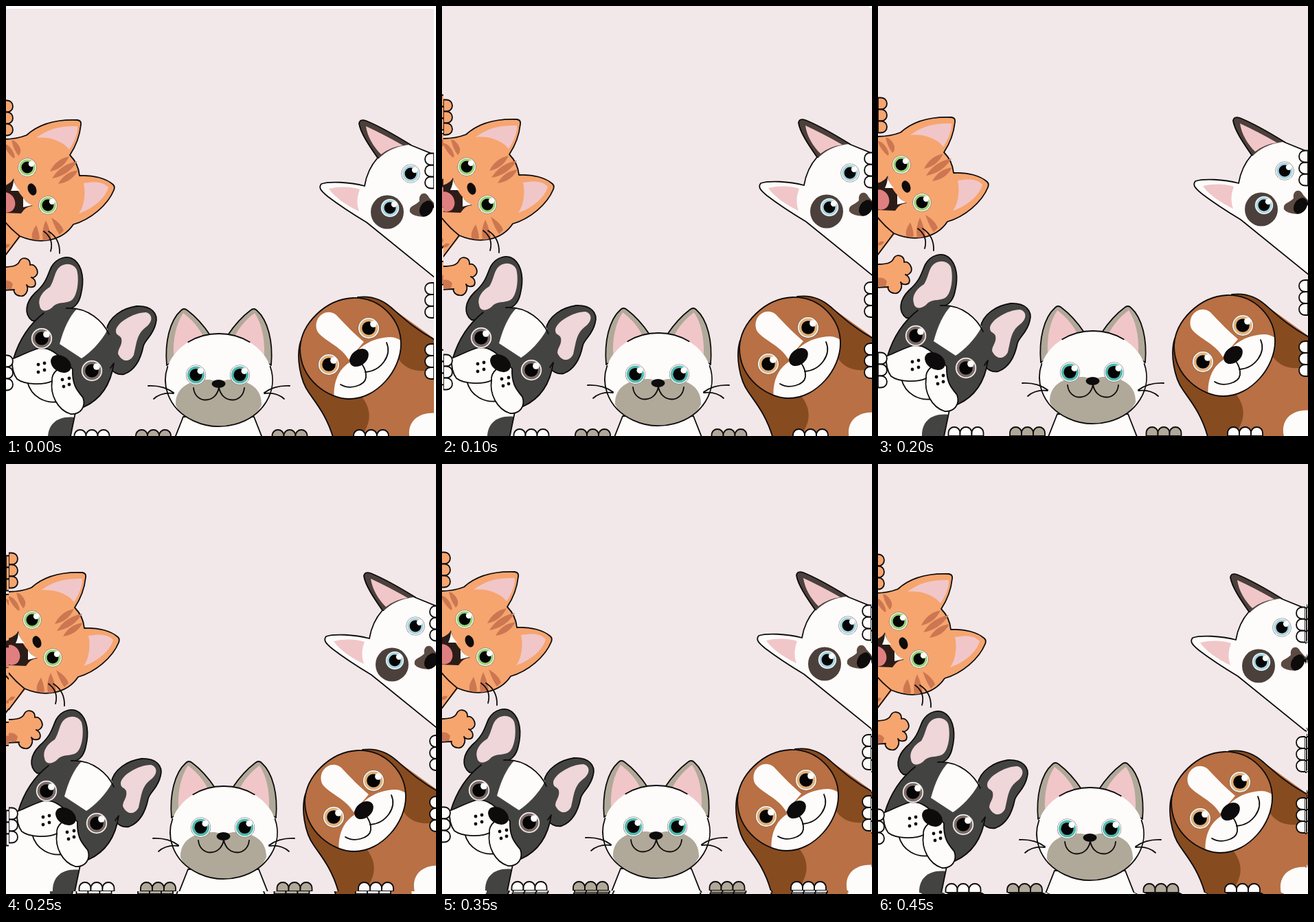
An HTML page with a canvas for the animation above (500 ms loop, 626 by 626 pixels).

```html
<!DOCTYPE html>
<html lang="en">
<head>
<meta charset="utf-8">
<title>Shaking pets</title>
<style>
  html, body { margin: 0; width: 100%; height: 100%; overflow: hidden; background: #fff; }
  canvas { display: block; }
</style>
</head>
<body>
<canvas id="stage" width="626" height="626"></canvas>
<script>
const SIZE = 626, STEP = 50;
// Position of the scene at each step of the shake
const SHAKE = [[-3, 4], [-4, -4], [2, 3], [-5, 4], [0, 0], [4, -4], [1, -2], [-1, -5], [-2, -1], [-4, -2]];
const INK = '#0d0b0b', WHITE = '#fdfcfb', PINK = '#f1c6c8', GREY = '#b0a999';
const ORANGE = '#f6a56f', RUST = '#cc7751', COAL = '#434341', BLUSH = '#efd6d8';
const TAN = '#b87044', BROWN = '#874b20', COCOA = '#4b403b';

const scene = document.createElement('canvas');
scene.width = scene.height = SIZE;
const c = scene.getContext('2d');

function fill(d, color) {
  c.fillStyle = color;
  c.fill(new Path2D(d));
}
function line(d) {
  c.stroke(new Path2D(d));
}
function shape(d, color) {
  fill(d, color);
  line(d);
}
function oval(x, y, rx, ry, color, degrees = 0) {
  c.beginPath();
  c.ellipse(x, y, rx, ry, degrees * Math.PI / 180, 0, 7);
  c.fillStyle = color;
  c.fill();
}
function eye(x, y, r, color) {
  oval(x, y, r + .6, r + .6, '#6d6762');
  oval(x, y, r, r, WHITE);
  oval(x, y, r * .9, r * .9, color);
  oval(x, y, r * .65, r * .65, '#050505');
  oval(x + r * .46, y - r * .4, r * .32, r * .32, WHITE);
}
// Tapered stripe between two points
function leaf(x1, y1, x2, y2, w, color = RUST) {
  const len = Math.hypot(x2 - x1, y2 - y1), nx = (y1 - y2) / len * w, ny = (x2 - x1) / len * w;
  const mx = (x1 + x2) / 2, my = (y1 + y2) / 2;
  fill(`M${x1},${y1}Q${mx + nx},${my + ny} ${x2},${y2}Q${mx - nx},${my - ny} ${x1},${y1}Z`, color);
}
// Three toes gripping an edge; angle 0 points up
function paw(x, y, degrees, color) {
  c.save();
  c.translate(x, y);
  c.rotate(degrees * Math.PI / 180);
  for (const toe of [-17, 0, 17]) {
    shape(`M${toe - 8.5},0V-4C${toe - 8.5},-16 ${toe + 8.5},-16 ${toe + 8.5},-4V0Z`, color);
  }
  c.restore();
}

function orangeCat() {
  fill('M-4,290L24,333L-4,368Z', ORANGE);
  line('M20,335L-4,367');
  leaf(-4, 352, 6, 347, 5);
  shape('M-5,194C8,194 20,192 30,188C52,168 80,165 104,166Q110,167 109,173C107,192 101,205 93,217' +
    'C102,226 106,236 107,247C128,246 146,251 156,260Q159,263 157,268C148,290 123,311 98,318' +
    'C82,342 50,348 20,335Q6,324 -5,310Z', ORANGE);
  fill('M44,192C60,179 80,174 104,175C105,186 98,200 92,209C82,196 62,190 44,192Z', PINK);
  fill('M113,258C130,255 142,256 149,264C145,280 125,296 106,302C115,290 116,270 113,258Z', PINK);
  leaf(92, 219, 64, 241, 9);
  leaf(104, 226, 67, 251, 10);
  leaf(105, 239, 76, 259, 9);
  fill('M8,195Q17,197 21,208Q22,215 18,218Q11,209 8,195Z', RUST);
  fill('M-4,200Q7,202 12,216Q14,223 10,221Q0,212 -4,200Z', RUST);
  fill('M44,319Q36,330 38,339Q44,342 49,339Q48,328 44,319Z', RUST);
  fill('M58,312Q51,327 54,341Q61,342 66,338Q64,325 58,312Z', RUST);
  fill('M66,308Q72,325 78,333L84,327Q81,317 66,308Z', RUST);
  eye(31, 235, 13, '#9bd275');
  eye(61, 290, 13, '#9bd275');
  oval(38, 267, 6, 9, INK, -22);
  fill('M-4,262Q7,259 11,251C14,264 18,271 25,279Q31,288 39,291Q29,291 22,302L-4,301Z', '#2b1c17');
  oval(0, 286, 13, 15, '#e07f80', -25);
  fill('M11,253Q13,262 20,269L7,269Q11,261 11,253Z', WHITE);
  fill('M25,279Q30,287 38,290L25,293Z', WHITE);
  line('M55,328Q70,339 65,357');
  line('M62,328Q79,339 78,360');
  shape('M-5,380C8,380 17,379 20,371C24,364 36,367 35,377C42,375 48,385 45,391C42,396 38,396 37,395' +
    'C45,399 44,408 39,409C34,410 31,408 30,406C34,414 28,424 20,422C12,421 11,414 12,413L-5,414Z', ORANGE);
  fill('M-4,400Q5,398 10,405L8,412H-4Z', RUST);
  paw(-3, 163, 90, ORANGE);
}

function frenchie() {
  fill('M-4,540H70L102,590L93,631H-4Z', WHITE);
  fill('M100,599C74,596 60,610 61,631H93Z', COAL);
  line('M101,592L93,631');
  shape('M38,458C26,449 28,432 42,418C60,402 60,392 66,380C74,366 90,362 100,370' +
    'C112,380 114,400 109,420C106,434 98,440 93,440L60,460Z', COAL);
  fill('M49,436C46,425 54,415 64,409C70,400 70,390 76,382C84,373 98,374 103,384' +
    'C107,398 104,420 97,427C90,434 78,430 70,436C60,447 50,445 49,436Z', BLUSH);
  shape('M146,472C150,452 170,440 190,437C212,436 222,448 218,462C214,480 203,485 200,495' +
    'C196,515 188,530 172,536Q160,538 152,528Z', COAL);
  fill('M160,473C160,462 185,446 204,446C216,450 212,462 203,468C190,478 190,492 186,508' +
    'C180,520 168,518 163,506C163,498 170,494 168,484C165,478 160,480 160,473Z', BLUSH);
  const head = 'M11,513C18,490 32,465 52,450C66,438 82,438 100,440C122,444 140,458 150,478' +
    'C158,492 160,505 157,520C152,555 135,574 113,584';
  fill(head + 'L70,550Z', COAL);
  fill('M104,440C124,444 140,457 148,471C138,490 122,505 110,513L78,492C84,470 92,452 104,440Z', WHITE);
  line('M55,447C32,465 18,490 11,513');
  line('M88,440C120,438 142,460 150,478');
  line('M152,527L157,520C152,555 135,574 113,584');
  shape('M31,547C37,570 58,579 76,576L68,540Z', WHITE);
  shape('M9,514C20,510 34,502 49,498C64,497 76,506 97,529C96,552 104,560 112,570' +
    'C117,584 108,595 94,594C75,588 64,566 67,546C55,552 28,552 16,543Q8,532 9,514Z', WHITE);
  line('M67,546Q66,537 74,530');
  oval(80, 521, 16, 11.5, INK, 32);
  for (const [x, y] of [[47, 522], [56, 520], [47, 533], [56, 530], [82, 544], [92, 542], [84, 554], [92, 551]]) {
    oval(x, y, 2.4, 2.4, INK);
  }
  eye(52, 484, 15, '#7b6b67');
  eye(125, 531, 15, '#7b6b67');
  paw(-3, 534, 90, WHITE);
  paw(125, 630, 0, WHITE);
}

function siamese() {
  const ear = 'M234,523C231,490 238,458 255,443Q259,439 264,443C276,452 287,464 297,479L270,500Z';
  const innerEar = 'M244,508C243,484 248,462 258,447C270,456 281,468 287,481Q260,488 244,508Z';
  shape('M258,598L245,631H374L361,598Z', WHITE);
  const mirrored = draw => {
    draw();
    c.save();
    c.translate(620, 0);
    c.scale(-1, 1);
    draw();
    c.restore();
  };
  mirrored(() => { shape(ear, GREY); fill(innerEar, PINK); });
  oval(310, 544.5, 78, 67.5, WHITE);
  c.save();
  c.clip();
  fill('M247,581C246,554 270,543 297,544Q310,548 323,544C350,543 373,554 372,581Q355,614 310,614Q264,614 247,581Z', GREY);
  c.restore();
  for (const [from, to] of [[-125, -55], [-17, 197]]) {
    c.beginPath();
    c.ellipse(310, 544.5, 78, 67.5, 0, from * Math.PI / 180, to * Math.PI / 180);
    c.stroke();
  }
  eye(276.5, 537, 14, '#52b8ae');
  eye(340.5, 537, 14, '#52b8ae');
  oval(309.5, 550, 10, 6, INK);
  mirrored(() => {
    line('M273,556C275,579 306,580 310,555');
    line('M207,553Q229,552 244,563');
    line('M215,572Q226,562 244,564');
  });
  paw(214.5, 630, 0, GREY);
  paw(413, 630, 0, GREY);
}

function beagle() {
  const back = 'M512,424Q540,420 562,440C580,456 600,474 630,489';
  const side = 'M429,488C422,510 428,545 441,563C452,579 468,598 477,631';
  fill(side + 'H630V489L562,440L512,424Z', TAN);
  fill(side + 'H513C530,612 535,592 519,570L470,540Z', BROWN);
  fill(back + 'V525C605,537 580,531 570,511Z', BROWN);
  fill('M588,631C582,606 600,589 630,593V631Z', WHITE);
  line(side);
  line(back);
  const head = 'M428,498C430,462 465,427 505,425C545,424 575,456 575,492C575,530 540,572 500,572' +
    'C470,572 428,545 428,498Z';
  fill(head, TAN);
  c.save();
  c.clip(new Path2D(head));
  fill('M478,576C475,545 486,528 500,519C510,498 530,483 560,482Q572,483 578,490V576Z', WHITE);
  c.restore();
  fill('M453,473C446,454 466,438 481,450C495,465 509,479 521,489L499,515C488,495 460,486 453,473Z', WHITE);
  line(head);
  oval(514, 512, 15.5, 11, INK, -40);
  line('M487,551C500,559 522,553 524,541Q525,531 518,521');
  line('M523,533C547,531 562,508 554,490');
  eye(528, 469, 15, '#e3b179');
  eye(470, 522, 15, '#e3b179');
  paw(531.5, 630, 0, WHITE);
}

function whiteCat() {
  shape('M541,221C530,205 516,185 514,171Q515,164 524,167C546,176 568,189 589,202L570,230Z', COCOA);
  fill('M524,175Q550,187 578,203Q560,205 546,216C535,205 526,190 524,175Z', PINK);
  fill('M630,219L588,202C558,204 528,225 522,262C500,256 470,255 459,259C454,265 460,270 468,277' +
    'C485,290 505,303 525,315L630,400Z', WHITE);
  line('M630,219L588,202M541,221Q526,238 522,262C500,256 470,255 459,259C454,265 460,270 468,277' +
    'C485,290 505,303 525,315L630,400');
  fill('M470,266C485,262 505,263 515,267C510,280 511,290 514,299C495,290 478,278 470,266Z', PINK);
  oval(555, 300, 24, 24.5, COCOA);
  eye(589, 244, 13, '#a5d4e2');
  eye(559, 294, 13, '#a5d4e2');
  fill('M588,300C586,290 596,291 602,284C600,273 611,268 616,279L626,290L608,307Q592,306 588,300Z', '#5b4a42');
  oval(612, 295, 9, 12.5, INK, 32);
  fill('M619,292L630,284V299Z', INK);
  for (const y of [240, 428.5, 517.5]) paw(623, y, -90, WHITE);
}

c.fillStyle = '#f2e8ea';
c.fillRect(0, 0, SIZE, SIZE);
c.translate(3, -4);
c.strokeStyle = INK;
c.lineWidth = 1.8;
c.lineCap = c.lineJoin = 'round';
orangeCat();
frenchie();
siamese();
beagle();
whiteCat();

const stage = document.getElementById('stage').getContext('2d');
const start = performance.now();

function render(now) {
  const step = Math.floor(Math.max(0, now - start) / STEP) % SHAKE.length;
  stage.fillStyle = '#fff';
  stage.fillRect(0, 0, SIZE, SIZE);
  // Earlier steps stay visible along the uncovered edges
  for (const [x, y] of SHAKE.slice(0, step + 1)) stage.drawImage(scene, x, y);
  requestAnimationFrame(render);
}
render(start);
</script>
</body>
</html>
```
